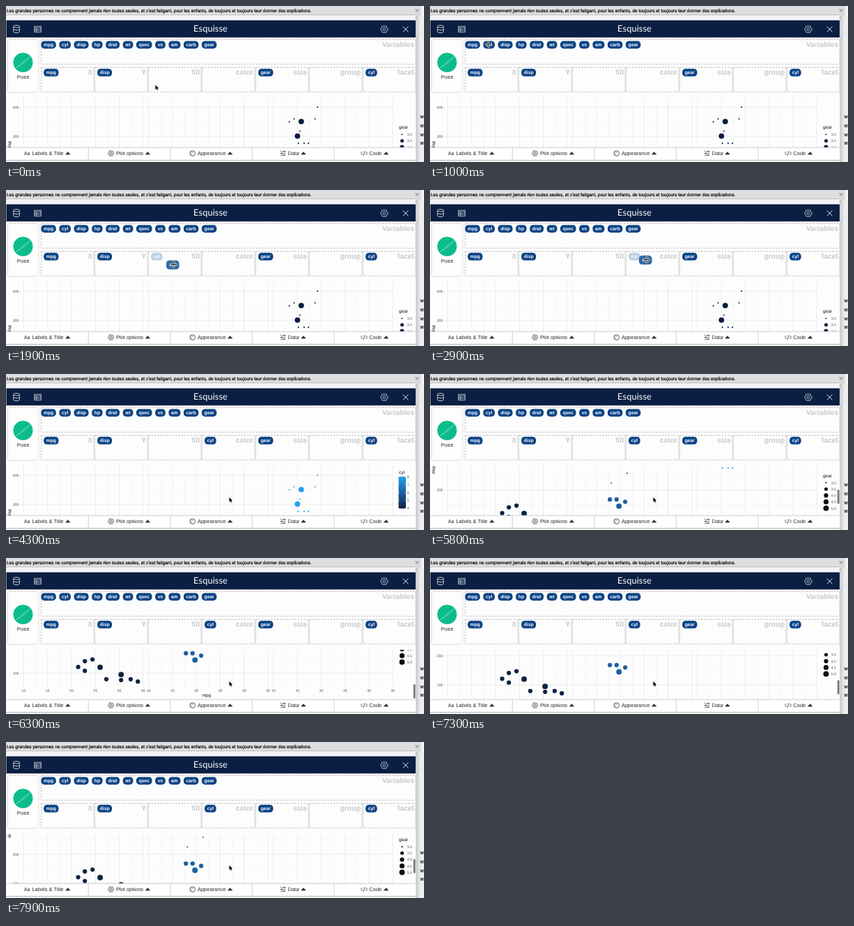
These frames come from a looping animation (600x225 px, 8000 ms). An HTML page with a canvas:

```html
<!DOCTYPE html>
<html lang="fr">
<head>
<meta charset="utf-8">
<title>Esquisse</title>
<style>
html, body { margin: 0; width: 100%; height: 100%; overflow: hidden; background: #fff; }
canvas { display: block; width: 600px; height: 225px; }
</style>
</head>
<body>
<canvas id="stage"></canvas>
<script>
const canvas = document.getElementById('stage');
const ctx = canvas.getContext('2d');
const ratio = window.devicePixelRatio || 1;
canvas.width = 600 * ratio;
canvas.height = 225 * ratio;

const LOOP = 8000, STEP = 100;
const GRAB = 1000, DRAG = 1600, DROP = 3100, REPLOT = 3500, SCROLL = 4800;
const NAVY = '#0a1f42', PILL = '#0c4386', DRAGGED = '#2f6ba6', GHOST = '#bcd0e4';
const GREY = '#c9c9ce', INK = '#2b2b2f', AXIS = '#4d4d4d';
const SANS = '"Liberation Sans", Arial, sans-serif';
const BLUES = ['#0c2342', '#1c5fa0', '#279ff0'];

// One facet per cylinder count; [mpg, disp] grouped by gear
const FACETS = [
  { 4: [[22.8, 108], [24.4, 147], [22.8, 141], [32.4, 79], [30.4, 76], [33.9, 71], [21.4, 121], [27.3, 79]],
    5: [[26, 120], [30.4, 95]] },
  { 3: [[21.4, 258], [18.1, 225]], 4: [[21, 160], [19.2, 168], [17.8, 168]], 5: [[19.7, 145]] },
  { 3: [[18.7, 360], [14.3, 360], [16.4, 276], [17.3, 276], [15.2, 276], [15.5, 318], [13.3, 350], [19.2, 400]],
    5: [[15.8, 351], [15, 301]] }
];

const easeOut = k => 1 - (1 - k) ** 2;
const easeInOut = k => k * k * (3 - 2 * k);

// Each leg is [begin, end, target]; the value rests between legs
function glide(value, legs, ease, t) {
  for (const [begin, end, target] of legs) {
    const k = ease(Math.min(1, Math.max(0, (t - begin) / (end - begin))));
    value = value.map((v, i) => v + (target[i] - v) * k);
  }
  return value;
}

const pointerAt = t => glide([214.5, 114], [
  [0, 1000, [84, 55]], [1500, 1900, [241, 107.5]], [1900, 2600, [311, 100.5]],
  [3200, 4100, [340, 189]], [4100, 4300, [320.5, 178]]
], easeOut, t);

const scrollAt = t => glide([0], [
  [4700, 5500, [59]], [5700, 6300, [106]], [6700, 8000, [67.5]]
], easeInOut, t)[0];

function text(str, x, y, size, color = INK, align = 'left', weight = 400, family = SANS) {
  ctx.font = `${weight} ${size}px ${family}`;
  ctx.fillStyle = color;
  ctx.textAlign = align;
  ctx.fillText(str, x, y);
}

function textWidth(str, size, weight = 400) {
  ctx.font = `${weight} ${size}px ${SANS}`;
  return ctx.measureText(str).width;
}

function rect(x, y, w, h, color) {
  ctx.fillStyle = color;
  ctx.fillRect(x, y, w, h);
}

function roundRect(x, y, w, h, r, color) {
  ctx.fillStyle = color;
  ctx.beginPath();
  ctx.roundRect(x, y, w, h, r);
  ctx.fill();
}

function dot(x, y, r, color) {
  ctx.fillStyle = color;
  ctx.beginPath();
  ctx.arc(x, y, r, 0, Math.PI * 2);
  ctx.fill();
}

function line(points, color, width = 0.8, close = false) {
  ctx.beginPath();
  points.forEach(([x, y]) => ctx.lineTo(x, y));
  if (close) ctx.closePath();
  ctx.strokeStyle = color;
  ctx.lineWidth = width;
  ctx.stroke();
}

function shape(points, color) {
  line(points, color, 0.1, true);
  ctx.fillStyle = color;
  ctx.fill();
}

function arc(x, y, rx, ry, color, end = Math.PI * 2) {
  ctx.beginPath();
  ctx.ellipse(x, y, rx, ry, 0, 0, end);
  ctx.strokeStyle = color;
  ctx.lineWidth = 0.8;
  ctx.stroke();
}

function cross(x, y, r, color) {
  line([[x - r, y - r], [x + r, y + r]], color, 1);
  line([[x + r, y - r], [x - r, y + r]], color, 1);
}

function gearIcon(x, y, r, color) {
  const corner = i => [x + r * Math.cos(i * Math.PI / 3), y + r * Math.sin(i * Math.PI / 3)];
  line([0, 1, 2, 3, 4, 5].map(corner), color, 0.8, true);
  arc(x, y, r * 0.38, r * 0.38, color);
}

function dashedBox(x, y, w, h) {
  ctx.setLineDash([2.6, 1.7]);
  ctx.strokeStyle = '#b9b7ba';
  ctx.lineWidth = 0.9;
  ctx.strokeRect(x, y, w, h);
  ctx.setLineDash([]);
}

// Returns the width so that pills can be laid out in a row
function pill(name, x, y, color = PILL, grow = 0) {
  const w = textWidth(name, 6.7, 700) + 7.3;
  roundRect(x - grow, y - 5.5 - grow, w + 2 * grow, 11 + 2 * grow, 4.6, color);
  text(name, x + w / 2, y + 2, 6.7, '#fff', 'center', 700);
  return w;
}

function drawBackdrop() {
  rect(0, 0, 600, 225, '#f4f5f4');
  rect(0, 0, 596, 13, '#dedddf');
  rect(0, 12.5, 596, 0.8, '#b5b4b7');
  const quote = 'Les grandes personnes ne comprennent jamais rien toutes seules, et c’est fatigant, ' +
    'pour les enfants, de toujours et toujours leur donner des explications.';
  text(quote, 1, 9, 6.48, '#000');
  ctx.strokeStyle = '#000';
  ctx.lineWidth = 0.2;
  ctx.strokeText(quote, 1, 9);
  cross(590, 6.5, 2.2, '#6a6a6d');

  const shadow = ctx.createLinearGradient(588, 0, 595, 0);
  shadow.addColorStop(0, '#c4c4c7');
  shadow.addColorStop(1, '#eeeeef');
  rect(588, 14, 12, 211, shadow);
  for (let i = 0; i < 4; i++) text('MB', 594.6, 162 + 12.8 * i, 6.2, '#222', 'left', 700);
  rect(0, 20, 588.3, 202, '#fdfdfd');
  rect(0, 222, 589, 1, '#b4b4b8');
}

function drawHeader() {
  const c = '#e9edf3';
  rect(0.5, 20.6, 587.5, 24.8, NAVY);
  text('Esquisse', 293.5, 37.4, 13, '#fff', 'center', 400, 'Lato, sans-serif');
  arc(15, 29.5, 4.4, 1.7, c);
  [33.2, 37].forEach(y => arc(15, y, 4.4, 1.7, c, Math.PI));
  [10.6, 19.4].forEach(x => line([[x, 29.5], [x, 37]], c));
  line([[40.7, 29.4], [50.3, 29.4], [50.3, 37.6], [40.7, 37.6]], c, 0.8, true);
  [31.8, 34.7].forEach(y => line([[40.7, y], [50.3, y]], c));
  line([[43.8, 31.8], [43.8, 37.6]], c);
  gearIcon(543, 33.5, 5.3, c);
  cross(573.7, 33.5, 3.7, c);
}

function drawGeomButton() {
  ctx.strokeStyle = '#dadadd';
  ctx.lineWidth = 0.9;
  ctx.beginPath();
  ctx.roundRect(2.5, 48.5, 44.5, 76, 2.5);
  ctx.stroke();
  dot(24.5, 81.5, 14, '#0cbd8b');
  for (let i = 0; i < 10; i++) dot(15.8 + i * 1.95, 88.8 - i * 1.62, 0.65, '#fff');
  text('Point', 24.5, 104.6, 7.6, INK, 'center');
}

function drawSlots(t, ghost) {
  dashedBox(50.5, 48.5, 537.5, 35.5);
  text('Variables', 586, 59.3, 10.5, GREY, 'right', 700);
  let left = 50.4;
  for (const name of 'mpg cyl disp hp drat wt qsec vs am carb gear'.split(' ')) {
    left += pill(name, left, 55.9) + 4.57;
  }
  const used = { X: 'mpg', Y: 'disp', size: 'gear', facet: 'cyl', color: t >= DROP && 'cyl' };
  ['X', 'Y', 'fill', 'color', 'size', 'group', 'facet'].forEach((label, i) => {
    const x = 50.5 + i * 77;
    dashedBox(x, 88.5, 75.5, 35.5);
    text(label, x + 73.7, 99.3, 10.5, GREY, 'right', 700);
    if (used[label]) pill(used[label], x + 3.6, 96.1);
    else if (i === ghost) pill('cyl', x + 3.6, 96.1, GHOST);
  });
}

const plotX = (mpg, facet) => 25.5 + 6.85 * (mpg - 10) + 179.3 * facet;
const plotY = disp => 146 + (400 - disp) * 0.42;
const radius = gear => 1.05 + 2.9 * Math.sqrt((gear - 3) / 2);

function drawLegend(colored) {
  if (colored) {
    text('cyl', 564, 144.3, 6.5, '#111');
    const ramp = ctx.createLinearGradient(0, 194, 0, 148);
    BLUES.forEach((c, i) => ramp.addColorStop(i / 2, c));
    rect(563.5, 148, 10.5, 46, ramp);
    for (let i = 0; i < 5; i++) {
      const y = 148.3 + i * 11.3;
      [563.5, 572].forEach(x => rect(x, y, 2, 0.4, '#fff'));
      text(8 - i, 575.7, y + 1.9, 5.1, AXIS);
    }
  }
  const top = colored ? 209 : 175;
  text('gear', 564, top + 2, 6.5, '#111');
  for (let i = 0; i < 5; i++) {
    const gear = 3 + i / 2, y = top + 10.3 + i * 9.2;
    dot(568.5, y, radius(gear), colored ? '#0c0c0e' : NAVY);
    text(gear.toFixed(1), 575.7, y + 1.9, 5.1, AXIS);
  }
}

function gridLine(points, major) {
  line(points, major ? '#e9e9ea' : '#f2f2f3', major ? 0.9 : 0.7);
}

function drawFacet(groups, f, colored) {
  for (let mpg = 10; mpg <= 35; mpg += 2.5) {
    const x = plotX(mpg, f), major = mpg % 5 === 0;
    gridLine([[x, plotY(492)], [x, plotY(51)]], major);
    if (major) text(mpg, x, plotY(36), 5.2, AXIS, 'center');
  }
  for (let disp = 100; disp <= 450; disp += 50) {
    gridLine([[plotX(9.2, f), plotY(disp)], [plotX(35.1, f), plotY(disp)]], disp % 100 === 0);
  }
  for (const gear in groups) {
    for (const [mpg, disp] of groups[gear]) {
      dot(plotX(mpg, f), plotY(disp), radius(gear), colored ? BLUES[f] : NAVY);
    }
  }
}

function drawPlot(scroll, colored) {
  ctx.save();
  ctx.beginPath();
  ctx.rect(0, 132.5, 588, 71.5);
  ctx.clip();
  ctx.translate(0, -scroll);
  FACETS.forEach((groups, f) => drawFacet(groups, f, colored));
  for (let v = 100; v <= 400; v += 100) text(v, 18.5, plotY(v) + 1.9, 5.2, AXIS, 'right');
  text('mpg', 288, 306, 6.4, '#111', 'center');
  drawLegend(colored);
  ctx.translate(7.3, 200.5);
  ctx.rotate(-Math.PI / 2);
  text('disp', 0, 0, 6.4, '#111', 'center');
  ctx.restore();
}

const menu = {
  'Labels & Title': x => text('Aa', x, 215.2, 7.4, INK, 'center'),
  'Plot options': x => gearIcon(x, 212.5, 4, INK),
  'Appearance': x => {
    arc(x, 212.5, 3.8, 3.8, INK);
    for (let a = 2; a < 6; a++) dot(x + 2 * Math.cos(a), 212.5 + 2 * Math.sin(a), 0.5, INK);
  },
  'Data': x => [2, -2, 1].forEach((knob, i) => {
    const y = 209.8 + i * 2.7;
    line([[x - 4, y], [x + 4, y]], INK, 0.6);
    dot(x + knob, y, 0.9, INK);
  }),
  'Code': x => {
    [-1, 1].forEach(s => line([[x + 2.3 * s, 210], [x + 4.8 * s, 212.5], [x + 2.3 * s, 215]], INK));
    line([[x + 1, 209.3], [x - 1, 215.7]], INK);
  }
};

function drawMenu() {
  rect(0, 204, 588, 18, '#fefefe');
  rect(0, 203.7, 588, 0.9, '#c8c8cc');
  Object.entries(menu).forEach(([label, icon], i) => {
    const center = 59.3 + i * 117.6, w = textWidth(label, 7.5);
    const left = center - w / 2 - 11, caret = left + w + 18;
    if (i) rect(center - 59.2, 204, 0.9, 18, '#cdcdd1');
    icon(left + 4.4);
    text(label, left + 11.6, 215.2, 7.5);
    shape([[caret - 3.6, 214.2], [caret, 210.3], [caret + 3.6, 214.2]], INK);
  });
}

function drawArrow(x, y) {
  const points = [[0, 0], [0, 6.4], [1.5, 5.1], [2.5, 7.4], [3.6, 6.9], [2.6, 4.7], [4.6, 4.6]]
    .map(([dx, dy]) => [x + dx, y + dy]);
  line(points, '#fff', 1.2, true);
  shape(points, '#000');
}

function drawMoveCursor(x, y) {
  for (const [color, width] of [['#fff', 1.8], ['#111', 0.9]]) {
    for (let i = 0; i < 4; i++) {
      const c = Math.round(Math.cos(i * Math.PI / 2)), s = Math.round(Math.sin(i * Math.PI / 2));
      const at = (u, v) => [x + u * c - v * s, y + u * s + v * c];
      line([at(0, 0), at(4, 0)], color, width);
      line([at(2.6, -1.4), at(4, 0), at(2.6, 1.4)], color, width);
    }
  }
}

function draw(t) {
  ctx.setTransform(ratio, 0, 0, ratio, 0, 0);
  ctx.textRendering = 'geometricPrecision';
  const [x, y] = pointerAt(t), scroll = scrollAt(t);
  const dragging = t >= DRAG && t < DROP;
  const slot = Math.floor((x - 50.5) / 77);

  drawBackdrop();
  drawHeader();
  drawGeomButton();
  drawSlots(t, dragging && y > 88 ? slot : -1);
  drawPlot(scroll, t >= REPLOT);
  if (t >= SCROLL) roundRect(584.8, 145 + scroll * 0.35, 2.8, 20.5, 1.4, '#77777b');
  drawMenu();
  if (dragging) pill('cyl', x - 10, y + 0.5, DRAGGED, 1);
  if (t >= GRAB && t <= DROP) drawMoveCursor(x, y);
  else drawArrow(x, y);
}

const start = performance.now();
function tick() {
  const t = (performance.now() - start) % LOOP;
  draw(Math.floor(t / STEP) * STEP);
  requestAnimationFrame(tick);
}
tick();
</script>
</body>
</html>
```
